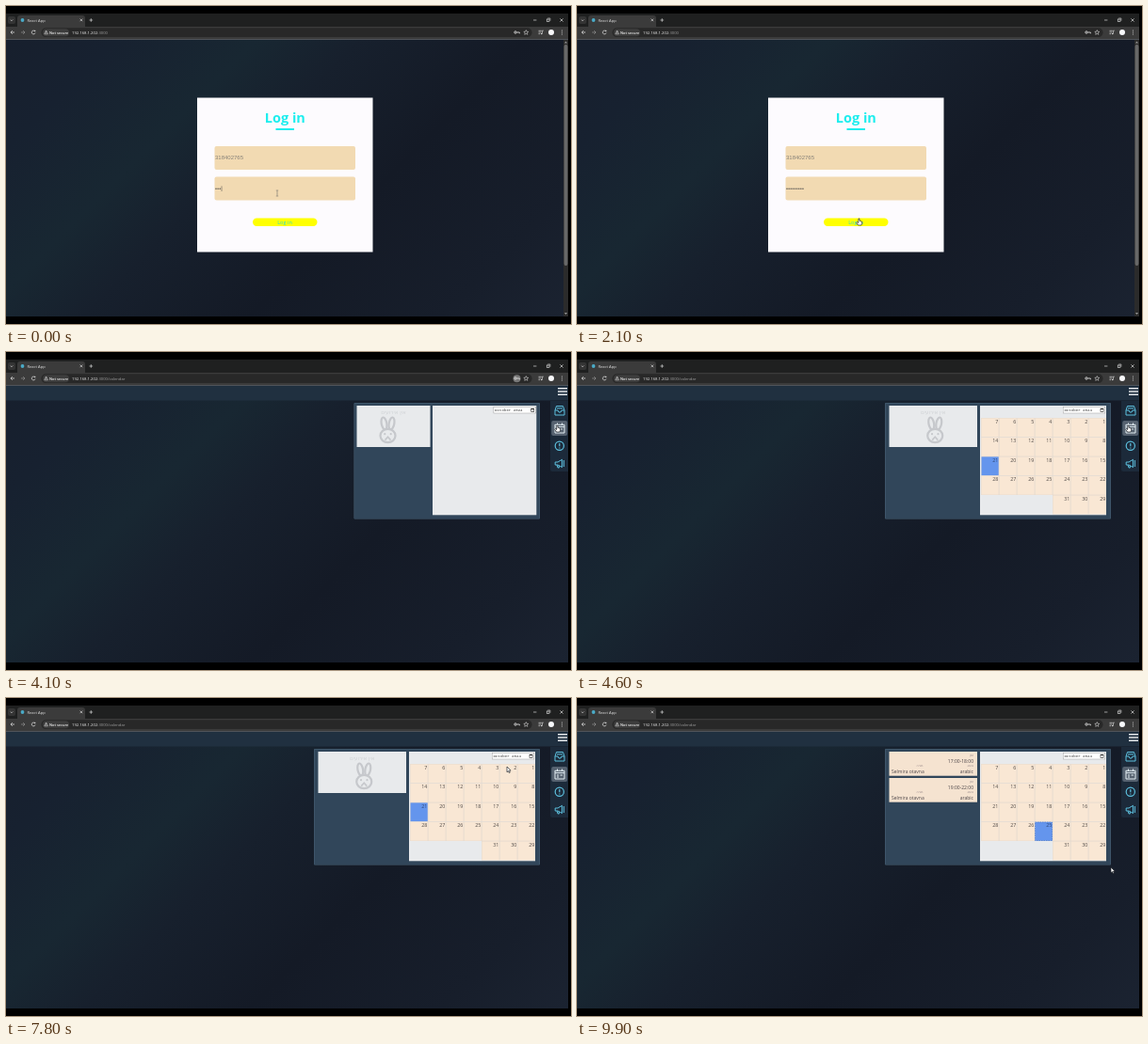
These frames come from a looping animation (600x338 px, 10000 ms). An HTML page with a canvas:

```html
<!DOCTYPE html>
<html lang="en">
<head>
<meta charset="utf-8">
<title>Calendar demo</title>
<style>
html, body { margin: 0; width: 100%; height: 100%; overflow: hidden; background: #000; }
canvas { display: block; width: 600px; height: 338px; }
</style>
</head>
<body>
<canvas id="stage" width="600" height="338"></canvas>
<script>
const c = document.getElementById('stage').getContext('2d');
const LOOP = 10000;
const LOGIN_END = 2200, OPEN_CAL = 3600, LOADED = 4450, PICK = 8700, EVENTS = 8900;
const SANS = '"Open Sans", "Noto Sans", sans-serif';
const ARIAL = '"Liberation Sans", Arial, sans-serif';
const MONO = '"Liberation Mono", monospace';
const HEB = '"DejaVu Sans", sans-serif';

// Pointer path: time, x, y of the tip
const PATH = [
  [0, 288, 199], [1200, 288, 199], [1900, 299, 226], [2300, 299, 226],
  [2800, 559, 84], [3000, 560, 84], [3500, 585, 78], [5500, 585, 78],
  [6300, 447, 143], [6800, 447, 143], [7600, 532, 73], [8000, 532, 73],
  [8600, 495, 141], [9000, 495, 141], [9500, 572, 188], [9900, 567, 180], [10000, 567, 180]
];

function rect(x, y, w, h, fill) {
  c.fillStyle = fill;
  c.fillRect(x, y, w, h);
}

function round(x, y, w, h, r, fill) {
  c.fillStyle = fill;
  c.beginPath();
  c.roundRect(x, y, w, h, r);
  c.fill();
}

function disc(x, y, r, fill) {
  c.fillStyle = fill;
  c.beginPath();
  c.arc(x, y, r, 0, 7);
  c.fill();
}

// Each argument after the width is one polyline: x, y, x, y, ...
function lines(color, width, ...paths) {
  c.strokeStyle = color;
  c.lineWidth = width;
  c.beginPath();
  for (const p of paths) {
    c.moveTo(p[0], p[1]);
    for (let i = 2; i < p.length; i += 2) c.lineTo(p[i], p[i + 1]);
  }
  c.stroke();
}

function ring(x, y, rx, ry, turn = 0) {
  c.beginPath();
  c.ellipse(x, y, rx, ry, turn, 0, Math.PI * 2);
  c.stroke();
}

function text(s, x, y, size, color, align = 'left', family = SANS, weight = '') {
  c.font = `${weight} ${size}px ${family}`;
  c.textAlign = align;
  c.fillStyle = color;
  c.fillText(s, x, y);
  return c.measureText(s).width;
}

function pageBack() {
  const x = 0, y = 36, w = 597, h = 294, d = (w + h) / 2;
  const g = c.createLinearGradient(x, y, x + d, y + d);
  g.addColorStop(0, '#171f2d');
  g.addColorStop(.13, '#172130');
  g.addColorStop(.3, '#182732');
  g.addColorStop(.42, '#17202d');
  g.addColorStop(.62, '#141a26');
  g.addColorStop(.85, '#171e2b');
  g.addColorStop(1, '#1b2331');
  rect(x, y, w, h, g);
}

function browser(t) {
  const ink = '#d6d6d6';
  rect(0, 8, 597, 14, '#1f2020');
  round(2, 11, 8, 8, 2, '#343434');
  lines(ink, .7, [4.7, 14.5, 6, 15.8, 7.3, 14.5]);
  round(12, 10, 72, 14, [3, 3, 0, 0], '#3b3b3b');
  disc(17.5, 15, 1.9, '#4aa9c6');
  text('React App', 22.5, 16.6, 4.1, '#e4e4e4');
  lines(ink, .7, [78.6, 13.6, 81.2, 16.2], [81.2, 13.6, 78.6, 16.2],
    [88.5, 15, 92.1, 15], [90.3, 13.2, 90.3, 16.8],
    [560, 15, 563.4, 15], [588.4, 13.4, 591.6, 16.6], [591.6, 13.4, 588.4, 16.6]);
  c.strokeRect(574.3, 14, 2.6, 2.6);
  lines(ink, .6, [575.2, 13, 577.9, 13, 577.9, 15.8]);

  rect(0, 22, 597, 13, '#3b3b3b');
  rect(0, 35, 597, 1, '#50545a');
  lines(ink, .8, [9, 28, 5, 28], [6.8, 26.2, 5, 28, 6.8, 29.8]);
  lines('#8a8a8a', .8, [16, 28, 20, 28], [18.2, 26.2, 20, 28, 18.2, 29.8]);
  c.strokeStyle = ink;
  c.beginPath();
  c.arc(29.2, 28, 1.9, .3, 5.4);
  c.stroke();
  rect(30, 25.8, 1.3, 1.3, ink);

  round(37.5, 23.3, 521, 9.8, 4.9, '#282828');
  round(39, 24.2, 28, 8, 4, '#3d3d3d');
  lines(ink, .6, [42.6, 26, 40.8, 29.8, 44.4, 29.8, 42.6, 26], [42.6, 27.3, 42.6, 28.7]);
  text('Not secure', 46, 29.6, 3.9, '#ececec', 'left', SANS, 600);
  const w = text('192.168.1.202', 70, 29.7, 4.2, '#eeeeee');
  text(':3000' + (t >= OPEN_CAL ? '/calendar' : ''), 70 + w, 29.7, 4.2, '#9d9d9d');

  if (t >= LOGIN_END && t < LOADED) round(538.5, 24.2, 8, 8, 4, '#777777');
  lines(ink, .9, [542.4, 28, 545.3, 28, 545.3, 29.3]);
  ring(541, 28, 1.2, 1.2);
  const star = [];
  for (let i = 0; i <= 10; i++) {
    const a = i * Math.PI / 5 - Math.PI / 2, r = i % 2 ? 1.2 : 2.6;
    star.push(552.3 + r * Math.cos(a), 28.2 + r * Math.sin(a));
  }
  lines(ink, .6, star);
  lines(ink, .7, [565.5, 26.3, 568.7, 26.3], [565.5, 28, 568, 28], [565.5, 29.7, 567, 29.7],
    [569.4, 29.4, 569.4, 26.2, 570.8, 26.2]);
  disc(568.7, 29.5, .8, ink);
  disc(579, 28, 3, '#f7f8fa');
  for (const y of [26, 28, 30]) disc(590.4, y, .55, ink);
}

function login(t) {
  rect(592, 36, 5, 294, '#2b2b2b');
  round(592.6, 41, 3.8, 235, 1.9, '#686868');
  c.fillStyle = '#9b9b9b';
  for (const [y, s] of [[38.5, -1], [327, 1]]) {
    c.beginPath();
    c.moveTo(593, y - s);
    c.lineTo(596, y - s);
    c.lineTo(594.5, y + s);
    c.fill();
  }
  rect(203, 97.5, 186.5, 164, '#fdfbfe');
  text('Log in', 296.3, 123.8, 14.5, '#1ceeee', 'center', SANS, 'bold');
  rect(286.5, 130, 19.5, 2, '#1ceeee');
  for (const y of [149, 181.5]) round(221.5, y, 149.5, 25, 2, '#f2dab2');
  text('318402765', 222, 163.2, 6, '#858078', 'left', ARIAL);

  const count = Math.min(9, 3 + Math.floor(t / 180));
  for (let i = 0; i < count; i++) disc(223 + i * 2.12, 194.3, .8, '#5d5a55');
  if (t < 1500 && t % 1000 < 500) rect(222.4 + count * 2.12, 191.4, .5, 5.6, '#444444');

  round(262, 225.5, 68.5, 8.4, 4.2, '#ffff00');
  text('Log in', 296, 231.7, 5.6, '#25dcd4', 'center');
}

function icons(t) {
  const active = t < OPEN_CAL ? 0 : 1;
  const tone = i => i === active ? '#e3eef3' : '#5cbfdd';
  round(578, 52, 19, 75, [0, 0, 0, 2], '#1c2a3a');
  round(579.2, active ? 73 : 54, 17, 16, 2, '#566270');

  lines(tone(0), 1, [583, 62, 584.5, 57.5, 591.5, 57.5, 593, 62],
    [583, 62, 583, 67, 593, 67, 593, 62, 590, 62, 589, 64, 587, 64, 586, 62, 583, 62],
    [585, 59.8, 591, 59.8]);

  lines(tone(1), 1, [583, 77.3, 593, 77.3, 593, 86, 583, 86, 583, 77], [583, 79.6, 593, 79.6],
    [585.5, 75.5, 585.5, 78], [590.5, 75.5, 590.5, 78],
    [585, 82, 587, 82], [588.5, 82, 591, 82], [585, 84, 587, 84]);

  lines(tone(2), 1.2, [587.8, 97, 587.8, 100.3], [587.8, 101.5, 587.8, 102.6]);
  ring(587.8, 99.8, 4.6, 4.6);

  lines(tone(3), 1, [583.2, 117, 586, 117, 590.5, 114.3, 590.5, 122.5, 586, 120, 583.2, 120, 583.2, 117],
    [585, 120, 586, 123, 587.4, 123, 587, 120.5], [592.4, 115, 592.4, 122]);
}

function bunny(x, y) {
  c.strokeStyle = '#c6c8cc';
  c.lineWidth = 2.2;
  ring(x - 4, y - 7, 2.8, 6.6, -.18);
  ring(x + 4, y - 7, 2.8, 6.6, .18);
  c.fillStyle = '#e8eaec';
  c.beginPath();
  c.ellipse(x, y + 6, 8, 7.2, 0, 0, 7);
  c.fill();
  c.stroke();
  disc(x - 3.2, y + 4.2, 1.1, '#c6c8cc');
  disc(x + 3.2, y + 4.2, 1.1, '#c6c8cc');
  lines('#c6c8cc', 1.6, [x - 3, y + 10.6, x, y + 7.2, x + 3, y + 10.6]);
}

function eventCard(y, hours) {
  const ink = '#4c4548', faint = '#97898a';
  rect(331.5, y, 93.5, 25.7, '#f5e3d0');
  text('זמן', 421, y + 5, 3.2, faint, 'right', HEB);
  text(hours, 421, y + 11.6, 5, ink, 'right');
  text('מורה', 367.5, y + 16.3, 3.2, faint, 'right', HEB);
  text('נושא', 421, y + 16.3, 3.2, faint, 'right', HEB);
  text('Selmira otavna', 334, y + 23.4, 5, ink);
  text('arabic', 421, y + 23.4, 5, ink, 'right');
}

function days(t) {
  const x0 = 429, y0 = 70, w = 19, h = 20.5;
  const picked = t < PICK ? 21 : 25;
  for (let d = 1; d <= 31; d++) {
    const col = 6 - (d - 1) % 7, row = Math.floor((d - 1) / 7);
    const x = x0 + col * w, y = y0 + row * h;
    rect(x, y, w, h, '#e1d8ce');
    rect(x + .5, y + .4, w - .8, h - .7, d === picked ? '#6495ed' : '#f9e7d4');
    if (d === picked && t >= PICK) {
      c.setLineDash([1.5, 1]);
      c.strokeStyle = '#4b7bd0';
      c.lineWidth = .7;
      c.strokeRect(x + .5, y + .5, w - 1, h - 1);
      c.setLineDash([]);
    }
    text(d, x + w - .6, y + 5.6, 5.3, d === picked ? '#2e4575' : '#4f4a48', 'right');
  }
}

function calendar(t) {
  const ready = t >= LOADED;
  const left = ready ? 327 : 369.5;
  const [cx, cw] = ready ? [331.5, 93.5] : [372.5, 78];
  const [gx, gw] = ready ? [428, 134] : [453, 110.3];
  const ix = ready ? 516 : 517.7;
  round(left, 54, 567 - left, 123.6, 1, '#486075');
  rect(left + .6, 54.6, 565.8 - left, 122.4, '#31465a');
  rect(gx, 57, gw, 116.3, '#e8eaec');
  rect(ix, 58, 45, 7.2, '#8b8b8b');
  rect(ix + .4, 58.4, 44.2, 6.4, '#ffffff');
  text('October 2024', ix + 1.4, 63.3, 4.1, '#333333', 'left', MONO);
  c.strokeStyle = '#222222';
  c.lineWidth = .6;
  c.strokeRect(ix + 40, 60.2, 3, 3.2);
  rect(ix + 40, 60, 3, 1, '#222222');
  if (ready) days(t);

  if (t < EVENTS) {
    rect(cx, 57, cw, 44, '#e8eaec');
    text('אין אירועים', cx + cw / 2, 66, 5.6, '#cfd2d5', 'center', HEB);
    bunny(cx + cw / 2 + (ready ? 2 : -6), 83);
  } else {
    eventCard(57, '17:00-18:00');
    eventCard(85, '19:00-22:00');
  }
}

function home(t) {
  if (t < OPEN_CAL) {
    rect(226, 51, 228, 188, 'rgba(10,14,24,.13)');
    c.strokeStyle = '#101722';
    c.lineWidth = 1;
    c.strokeRect(226.5, 51.5, 227, 187);
  }
  rect(0, 36, 597, 15.5, '#203040');
  for (const y of [38, 41.3, 44.6]) rect(586, y, 10, 1.4, '#eef1f3');
  icons(t);
  if (t >= OPEN_CAL) calendar(t);
}

function pointerAt(t) {
  const i = PATH.findIndex((p, n) => n && t <= p[0]);
  const [t0, x0, y0] = PATH[i - 1], [t1, x1, y1] = PATH[i];
  const k = (t - t0) / (t1 - t0), e = k * k * (3 - 2 * k);
  return [x0 + (x1 - x0) * e, y0 + (y1 - y0) * e];
}

function shape(points, x, y) {
  c.beginPath();
  for (let i = 0; i < points.length; i += 2) c.lineTo(x + points[i], y + points[i + 1]);
  c.closePath();
  c.lineWidth = .7;
  c.strokeStyle = '#20242a';
  c.fillStyle = '#ffffff';
  c.fill();
  c.stroke();
}

function pointer(t) {
  const [x, y] = pointerAt(t);
  const overButton = t < LOGIN_END && y > 224;
  const overIcon = x > 579 && y < 128;
  if (t < LOGIN_END && y < 207) {
    lines('#736f6a', .6, [x, y - 2.8, x, y + 2.8],
      [x - 1.2, y - 3, x + 1.2, y - 3], [x - 1.2, y + 3, x + 1.2, y + 3]);
  } else if (overButton || overIcon) {
    shape([0, 0, 1, 0, 1.2, 2.4, 3.6, 3.2, 3.7, 5.2, 2.9, 7, -.4, 7, -2.2, 4.4, -1.5, 3.7, -.3, 4.5], x, y);
  } else {
    shape([0, 0, 0, 5.8, 1.4, 4.6, 2.3, 6.6, 3.3, 6.1, 2.4, 4.2, 4.1, 4], x, y);
  }
}

function draw(t) {
  rect(0, 0, 600, 338, '#000000');
  pageBack();
  browser(t);
  if (t < LOGIN_END) login(t);
  else home(t);
  pointer(t);
}

const start = performance.now();
function tick() {
  const t = (performance.now() - start) % LOOP;
  draw(Math.floor(t / 100) * 100);
  requestAnimationFrame(tick);
}
tick();
</script>
</body>
</html>
```
